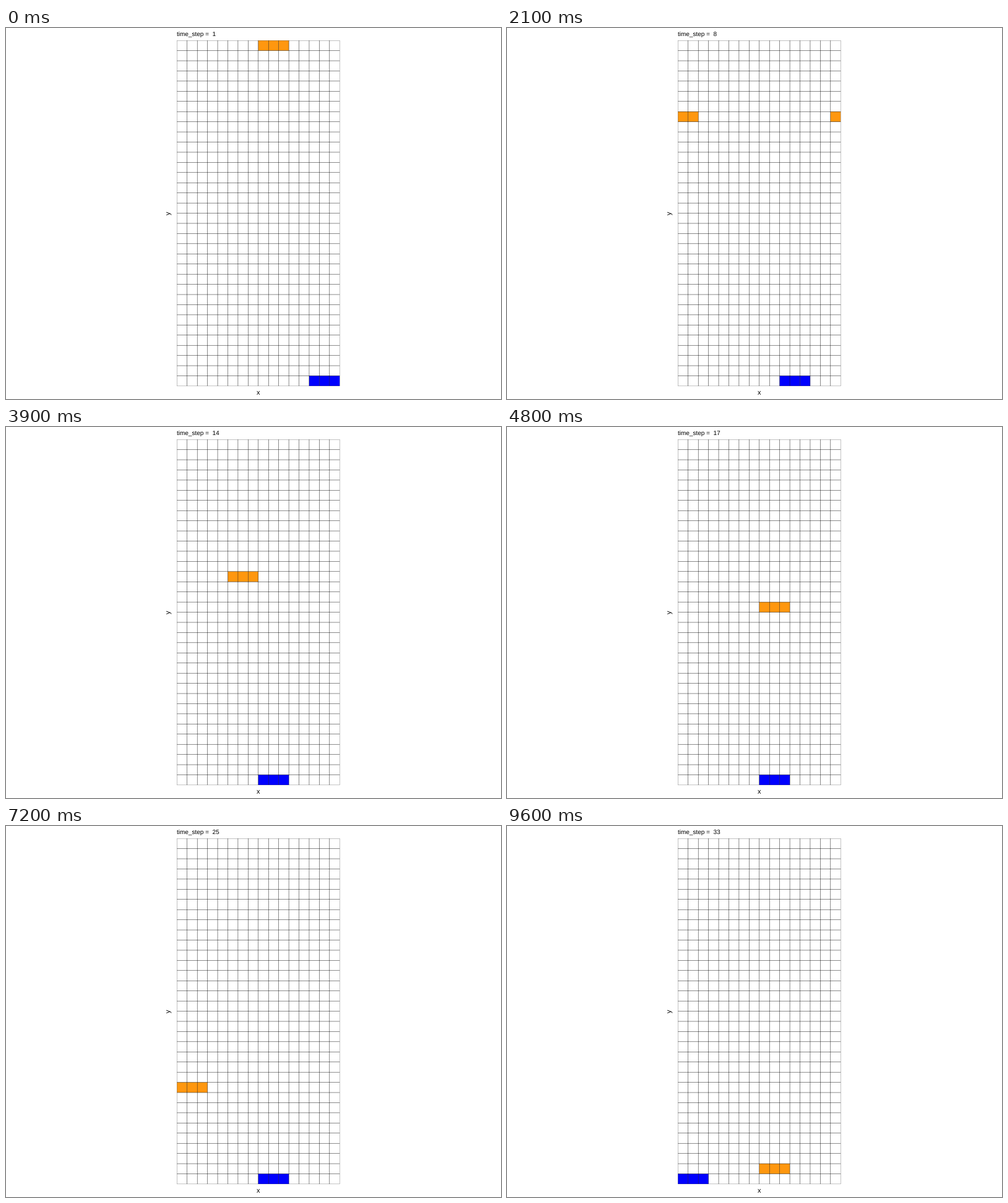
Recreate the animation shown at these times as a matplotlib script. Size 800 by 600 pixels, loop 9.9 s.

```python
import matplotlib.pyplot as plt
from matplotlib.animation import FuncAnimation
from matplotlib.collections import LineCollection
from matplotlib.patches import Rectangle

W, H, DPI = 800, 600, 100
COLS, ROWS, SPAN = 16, 34, 3
X0, Y0, CELL = 276.3, 20.15, 16.435
STEPS, INTERVAL = 33, 300
PX = 72 / DPI
ORANGE, BLUE = "#ff970f", "#0000ff"
EARLY_MOVES = (3, 6, 8, 10, 12)   # steps at which the paddle shifts left
LAST_RUN = 25                     # afterwards it shifts on every step

plt.rcParams["font.family"] = "Liberation Sans"
plt.rcParams["text.hinting"] = "none"
plt.rcParams["text.hinting_factor"] = 1

fig = plt.figure(figsize=(W / DPI, H / DPI), dpi=DPI, facecolor="white")
ax = fig.add_axes([0, 0, 1, 1])
ax.set_xlim(0, W)
ax.set_ylim(H, 0)
ax.axis("off")


def col_x(c):
    return X0 + c * CELL


def row_y(r):
    return Y0 + r * CELL


def make_cells(color):
    cells = [Rectangle((0, 0), CELL, CELL, fc=color, lw=0, snap=False)
             for _ in range(SPAN)]
    for cell in cells:
        ax.add_patch(cell)
    return cells


def place(cells, col, row):
    for i, cell in enumerate(cells):
        cell.set_xy((col_x((col + i) % COLS), row_y(row)))


def add_grid():
    lines, widths = [], []
    for c in range(COLS + 1):
        lines.append([(col_x(c), row_y(0)), (col_x(c), row_y(ROWS))])
        widths.append(0.24 if c in (0, COLS) else 0.46)
    for r in range(ROWS + 1):
        lines.append([(col_x(0), row_y(r)), (col_x(COLS), row_y(r))])
        widths.append(0.24 if r in (0, ROWS) else 0.46)
    grid = LineCollection(lines, colors="black", capstyle="butt", zorder=3,
                          linewidths=[w * PX for w in widths])
    grid.set_snap(False)
    ax.add_collection(grid)


def paddle_col(step):
    moves = sum(step >= m for m in EARLY_MOVES)
    return 13 - moves - max(0, step - LAST_RUN)


ball = make_cells(ORANGE)
paddle = make_cells(BLUE)
add_grid()

title = ax.text(276, 13, "", size=10 * PX, va="baseline")
ax.text(col_x(COLS / 2), 593, "x", size=11 * PX, ha="center", va="baseline")
ax.text(269, row_y(ROWS / 2), "y", size=11 * PX, rotation=90,
        ha="right", va="center")


def update(i):
    step = i + 1
    title.set_text(f"time_step =  {step}")
    place(ball, 7 + step, i)
    place(paddle, paddle_col(step), ROWS - 1)
    return [title, *ball, *paddle]


anim = FuncAnimation(fig, update, frames=STEPS, interval=INTERVAL,
                     repeat=True, repeat_delay=0, blit=False)
plt.show()
```
